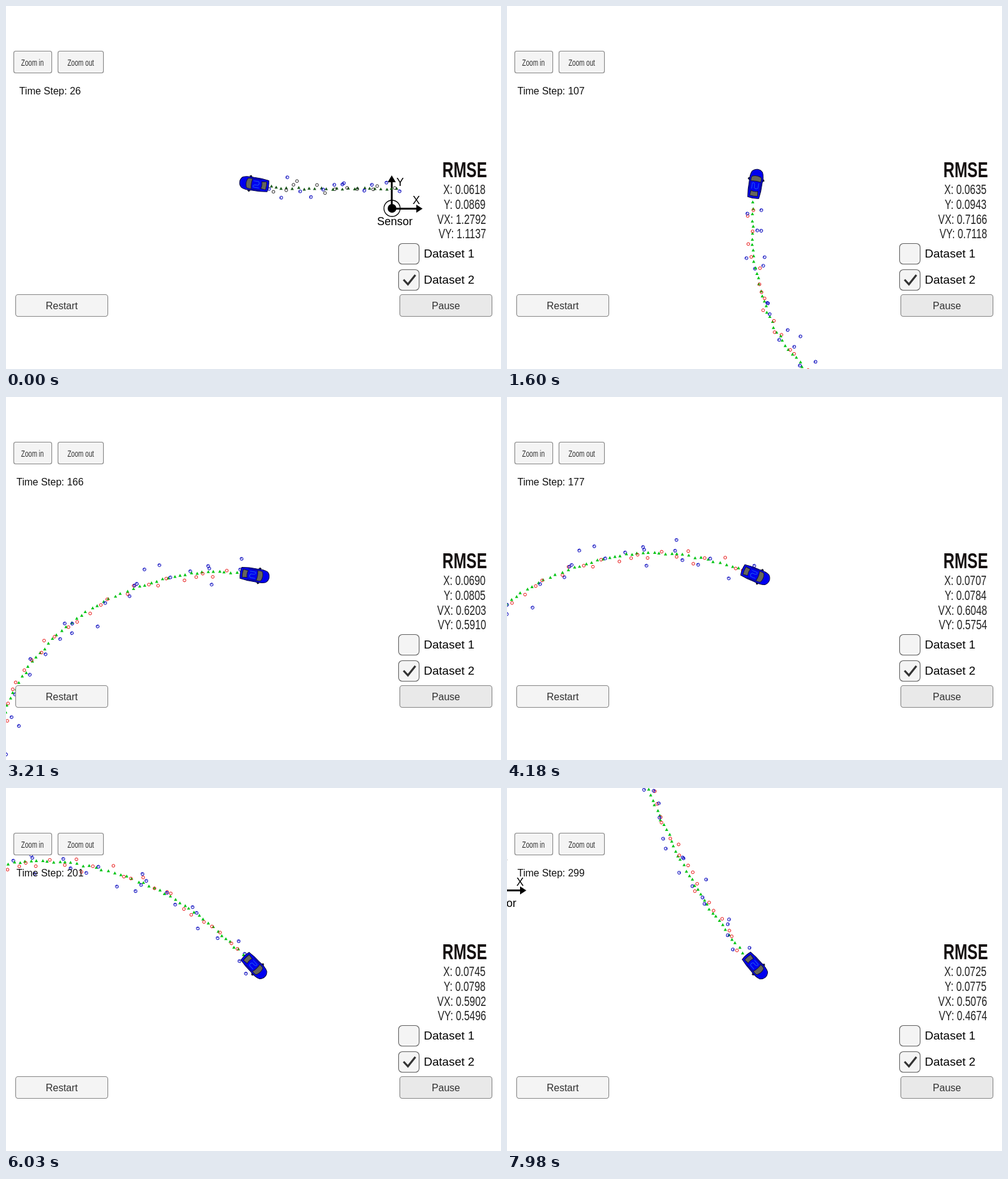
Recreate the animation shown at these times as an HTML page with a canvas. Size 795 px wide and 583 px high, loop 8 s.

```html
<!DOCTYPE html>
<html lang="en">
<head>
<meta charset="utf-8">
<title>Sensor fusion tracker</title>
<style>
html, body { margin: 0; width: 795px; height: 583px; overflow: hidden; background: #fff; }
canvas { display: block; }
</style>
</head>
<body>
<canvas id="stage" width="795" height="583"></canvas>
<script>
const ctx = document.getElementById('stage').getContext('2d');
const LOOP = 8000, CAR = { x: 399, y: 286 };

// The view redraws in even runs: from, to (ms), number of redraws. The middle is slow.
const ticks = [[70, 2530, 33], [2600, 3400, 10], [3860, 4180, 4], [4340, 5420, 9], [5580, 7980, 32]]
  .flatMap(([from, to, n]) => Array.from({ length: n }, (_, i) => from - 15 + (to - from) * i / (n - 1)));

// Readings along the drive: redraw count, time step, RMSE of X, Y, VX, VY.
const readings = [
  [0, 26, .0618, .0869, 1.2792, 1.1137],
  [21, 107, .0635, .0943, .7166, .7118],
  [32, 150, .0665, .0836, .6436, .6144],
  [47, 177, .0707, .0784, .6048, .5754],
  [63, 201, .0745, .0798, .5902, .5496],
  [75, 247, .0725, .0779, .5465, .4997],
  [88, 299, .0725, .0775, .5076, .4674]
];

// Key points of the drive: time step, x, y relative to the sensor.
const route = [
  [0, 8, -32], [26, -221, -39], [56, -490, -122], [80, -657, -267], [107, -696, -511],
  [120, -657, -640], [135, -561, -751], [150, -421, -815], [163, -303, -825], [177, -168, -791],
  [201, 10, -658], [224, 126, -487], [247, 203, -294], [262, 246, -162], [280, 315, -16],
  [299, 417, 122], [308, 482, 192]
];

const mix = (a, b, k) => a + (b - a) * k;

function span(table, x) {
  const i = Math.max(1, table.findIndex(row => row[0] >= x));
  const a = table[i - 1], b = table[i];
  return { i, a, b, k: (x - a[0]) / (b[0] - a[0]) };
}

function reading(count) {
  const { a, b, k } = span(readings, count);
  return a.map((v, j) => mix(v, b[j], k));
}

// Slope at a key point: the slopes on both sides, the shorter side counting more.
function slope(i, axis) {
  const rate = j => (route[j + 1][axis] - route[j][axis]) / (route[j + 1][0] - route[j][0]);
  if (i === 0) return rate(0);
  if (i === route.length - 1) return rate(i - 1);
  const [before, here, after] = [i - 1, i, i + 1].map(j => route[j][0]);
  return mix(rate(i - 1), rate(i), (here - before) / (after - before));
}

// Smooth cubic through the key points.
function position(step) {
  const { i, a, b, k } = span(route, step);
  const [x, y] = [1, 2].map(axis => {
    const d = b[axis] - a[axis], w = b[0] - a[0];
    const m = slope(i - 1, axis) * w - d, n = d - slope(i, axis) * w;
    return mix(a[axis], b[axis], k) + k * (1 - k) * mix(m, n, k);
  });
  return { x, y };
}

let seed = 7;
const random = () => (seed = seed * 16807 % 2147483647) / 2147483647;
const spread = size => (random() + random() + random() - 1.5) * size;

// Estimates hug the path; radar gets less exact with distance.
const marks = [];
function addMark(kind, step, p, size) {
  marks.push({ kind, step, x: p.x + spread(size), y: p.y + spread(size) });
}
for (let step = 0; step < 300; step++) {
  const p = position(step);
  addMark('estimate', step, p, 2);
  if (step % 2) addMark('lidar', step, p, 9);
  else addMark('radar', step, p, 12 + Math.hypot(p.x, p.y) / 80);
}

function text(str, x, y, size, { align = 'left', color = '#000', weight = '', squeeze = 1 } = {}) {
  ctx.save();
  ctx.translate(x, y);
  ctx.scale(squeeze, 1);
  ctx.font = `${weight} ${size}px "Liberation Sans", Arial, sans-serif`;
  ctx.textAlign = align;
  ctx.fillStyle = color;
  ctx.fillText(str, 0, 0);
  ctx.restore();
}

function box(x, y, w, h, r, fill = '#f4f4f4', stroke = '#858585') {
  ctx.beginPath();
  ctx.roundRect(x + .5, y + .5, w, h, r);
  ctx.fillStyle = fill;
  ctx.fill();
  ctx.strokeStyle = stroke;
  ctx.lineWidth = 1.1;
  ctx.stroke();
}

function shape(d, fill, stroke, width = 1) {
  const p = new Path2D(d);
  if (fill) { ctx.fillStyle = fill; ctx.fill(p); }
  if (stroke) { ctx.strokeStyle = stroke; ctx.lineWidth = width; ctx.stroke(p); }
}

const ring = r => `M${r} 0A${r} ${r} 0 1 1-${r} 0A${r} ${r} 0 1 1 ${r} 0`;

function drawMark({ kind, x, y }, early) {
  ctx.save();
  ctx.translate(x, y);
  if (kind === 'estimate') shape('M0-2.5L2.6 2.2H-2.6Z', early ? '#1c5a1c' : '#00c414');
  else if (kind === 'lidar') shape(ring(2.3), null, early ? '#222' : '#e81010');
  else {
    ctx.rotate(Math.atan2(y, x));
    shape(ring(2.3) + 'M0 0H2', null, '#1010c0');
  }
  ctx.restore();
}

function drawSensor() {
  shape(ring(13), null, '#000', 1.3);
  shape(ring(7) + 'M-.5-53L6-42H-7ZM49 .5L39-6V7Z', '#000');
  shape('M-.5 0V-43M0 .5H40', null, '#000', 3);
  text('X', 33, -7, 18);
  text('Y', 7, -36, 18);
  text('Sensor', -24, 27, 18);
}

function drawCar(angle) {
  ctx.save();
  ctx.translate(CAR.x, CAR.y);
  ctx.rotate(angle);
  shape('M5-10L7-13L9-12L8-10M5 10L7 13L9 12L8 10', '#0000b8', '#111');
  shape('M-22-9Q-10-11 2-10.5Q14-11.5 20-8.5Q24-5 24 0Q24 5 20 8.5Q14 11.5 2 10.5Q-10 11-22 9Q-24 0-22-9Z', '#0000f0', '#08083c');
  shape('M4-8Q10-9 12-7Q15 0 12 7Q10 9 4 8Q6 0 4-8ZM-19-6.5L-11-5.5Q-13 0-11 5.5L-19 6.5Q-20 0-19-6.5Z', '#66665c', '#151540');
  shape('M-11-8.5H4M-11 8.5H4', null, '#101070');
  shape('M-8-5H1Q3-2-1-1H-6Q-9 2-6 5H2', null, '#2058f0');
  ctx.restore();
}

function drawPanel(step, errors) {
  const label = { align: 'center', color: '#323232' };
  const narrow = { squeeze: .72 };
  box(12, 72, 61, 35, 3);
  box(83, 72, 73, 35, 3);
  text('Zoom in', 42.5, 96, 14, { ...label, ...narrow });
  text('Zoom out', 120, 96, 14, { ...label, ...narrow });
  text('Time Step: ' + step, 70.7, 142, 16, { align: 'center', color: '#111' });
  box(15, 463, 148, 35, 4);
  text('Restart', 89.5, 487, 16, label);
  box(632, 463, 148, 35, 4, '#e9e9e9');
  text('Pause', 706.5, 487, 16, label);

  [1, 2].forEach(n => {
    const y = 339 + 42 * n;
    box(630, y, 33, 33, 6, '#f4f4f4', '#606060');
    text('Dataset ' + n, 671, y + 23, 19);
  });
  shape('M638.5 439.5L645.5 447L657.5 432', null, '#333', 3.2);

  const right = { align: 'right', ...narrow };
  text('RMSE', 772.5, 275, 34.5, { ...right, weight: 'bold', color: '#151010' });
  ['X', 'Y', 'VX', 'VY'].forEach((name, i) => {
    text(`${name}: ${errors[i].toFixed(4)}`, i < 2 ? 770 : 771, 302 + 23.8 * i, 22, { ...right, color: '#222' });
  });
}

function draw(time) {
  const [, rawStep, ...errors] = reading(ticks.filter(t => t <= time).length);
  const step = Math.round(rawStep), at = position(step);
  const back = position(step - 1), ahead = position(step + 1);

  ctx.fillStyle = '#fff';
  ctx.fillRect(0, 0, 795, 583);
  ctx.save();
  ctx.translate(CAR.x - at.x, CAR.y - at.y);
  drawSensor();
  marks.filter(m => m.step <= step).forEach(m => drawMark(m, step < 30));
  ctx.restore();
  drawCar(Math.atan2(ahead.y - back.y, ahead.x - back.x));
  drawPanel(step, errors);
}

const began = performance.now();
function frame() {
  draw((performance.now() - began) % LOOP);
  requestAnimationFrame(frame);
}
frame();
</script>
</body>
</html>
```
